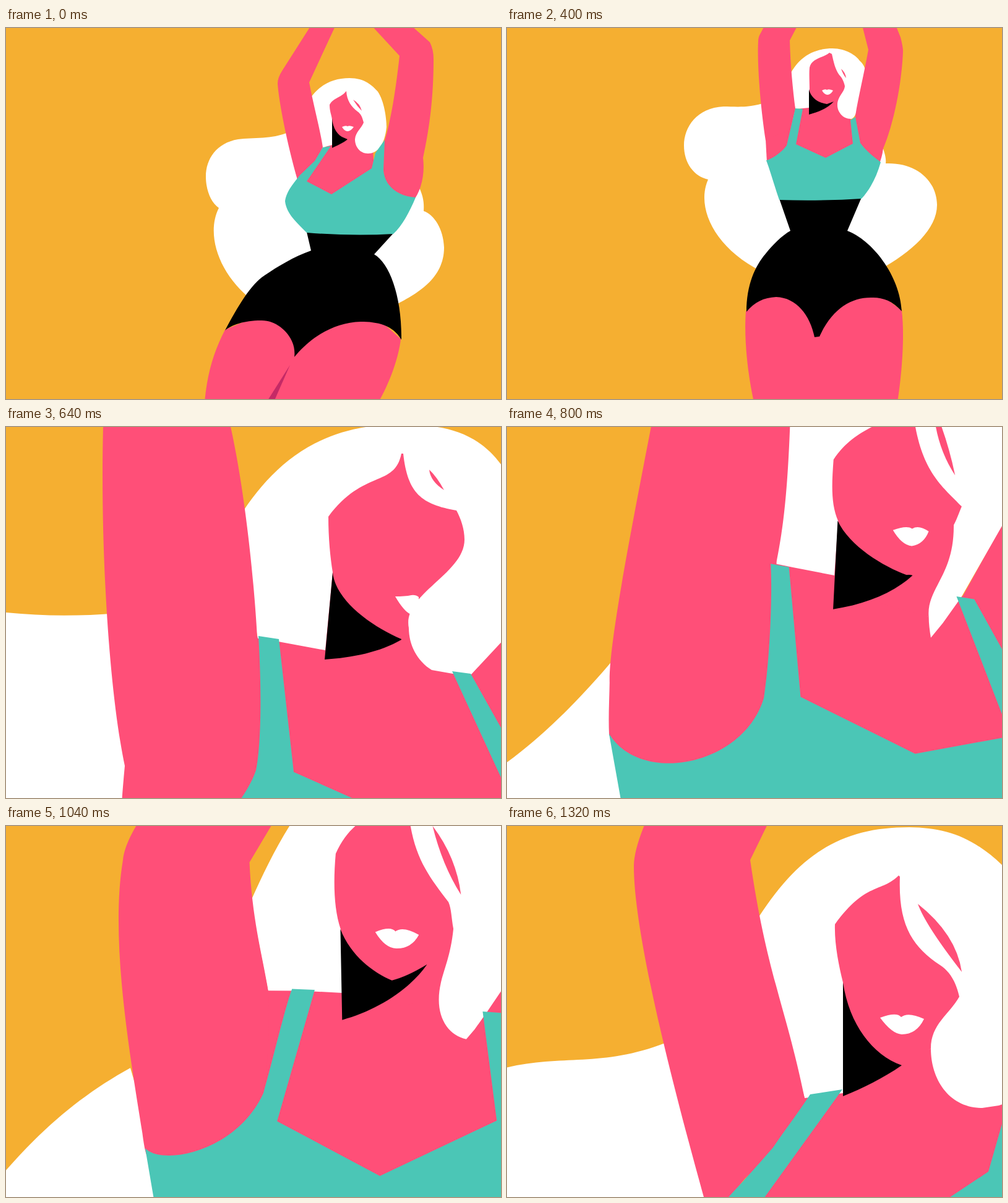
Write an HTML page that moves like this. It is 800 px wide and 600 px high and loops after 1.36 s.

```html
<!DOCTYPE html>
<html lang="en">
<head>
<meta charset="utf-8">
<title>Dancer</title>
<style>
  html, body { margin: 0; width: 100%; height: 100%; overflow: hidden; background: #f5af31; }
  svg { display: block; width: 100vw; height: 100vh; }
</style>
</head>
<body>
<svg id="stage" viewBox="0 0 800 600"></svg>
<script>
const PINK = '#ff4f78', TEAL = '#4bc6b6', WHITE = '#fff', BLACK = '#000', CREASE = '#c42a66';
const LOOP = 1360, CUT = 600, STEP = 40, SETTLE = 60;

// Each part: colour, then one path per key pose, back to front.
const wide = {
  times: [0, 160, 400],
  parts: [
    // back hair
    [WHITE,
      'M455 169C430 180 400 177 375 180C340 186 323 212 323 240C323 262 331 282 344 291C322 335 345 400 400 442L625 450C665 430 708 405 708 355C707 325 692 302 675 296C676 280 674 270 664 250Z',
      'M440 150C415 160 385 157 365 160C325 164 304 197 304 228C304 255 318 277 336 286C318 320 330 385 390 436L620 446C660 425 700 395 700 351C700 315 680 292 655 285C656 270 650 245 643 215Z',
      'M420 120C390 130 370 127 350 127C307 129 286 160 286 190C286 218 302 240 325 245C305 290 335 355 410 393L600 392C655 362 695 325 695 286C694 245 660 217 612 219C613 212 611 203 606 190Z'],
    // chest
    [PINK,
      'M525 180L590 150L595 230L526 275L480 250Z',
      'M500 160L570 130L575 210L516 247L470 222Z',
      'M475 128L550 100L560 190L515 215L462 190Z'],
    // hair
    [WHITE,
      'M512 193L485 125C500 95 525 81 555 81C580 81 592 93 601 103C611 118 615 145 615 160C612 190 600 203 585 203C572 203 564 192 564 180Z',
      'M491 165L478 105C490 75 515 54 546 54C570 54 585 66 593 75C600 88 602 100 600 110C594 150 592 183 578 183C566 183 557 172 557 160Z',
      'M466 131L455 80C468 52 490 33 526 33C548 33 565 45 570 53C578 60 580 68 578 72C572 110 566 147 556 147C542 147 534 135 534 125Z'],
    // face
    [PINK,
      'M550 102C540 114 530 112 523 124C523 135 526 140 527 148L527 194L560 200L564 180C565 168 574 163 578 153C576 145 574 139 568 135C558 127 551 118 550 102Z',
      'M537 67C534 80 522 76 517 84C514 95 516 108 517 120L517 167L552 176L557 160C558 150 566 144 567 133C566 122 562 114 556 108C547 97 544 85 544 65Z',
      'M521 40C513 48 492 48 489 64C488 74 489 86 489 100L489 139L528 145L534 125C534 110 545 105 546 94C544 85 541 80 537 76C530 66 528 55 525 42Z'],
    // gap in the fringe
    [PINK,
      'M561 116Q572 122 575 134Q567 126 561 116Z',
      'M556 93Q556 93 556 93Q556 93 556 93Z',
      'M540 66Q547 72 548 81Q543 75 540 66Z'],
    // neck shadow
    [BLACK,
      'M527 146C528 163 537 174 545 177L552 180C545 186 535 190 527 194Z',
      'M516 119C520 137 533 147 543 149L555 144C545 157 530 164 517 169Z',
      'M488 99C491 113 503 121 517 123L528 119C518 130 503 136 488 140Z'],
    // lips
    [WHITE,
      'M543 160Q549 157 552 159Q555 157 562 160Q557 167 552 167Q547 167 543 160Z',
      'M534 127Q540 124 543 126Q546 124 553 127Q548 134 543 134Q538 134 534 127Z',
      'M509 101Q514 98 517 100Q520 98 527 101Q523 108 518 108Q513 108 509 101Z'],
    // left arm
    [PINK,
      'M503 -20L447 68Q439 80 439 90C441 120 455 190 471 245L499 220L512 193C508 165 497 125 490 88L540 -20Z',
      'M467 -20L431 40Q425 50 425 56C427 100 437 170 447 213L446 234L477 205L491 165C484 130 478 90 475 57L512 -20Z'.replace('L446 234', ''),
      'M425 -20L409 10Q406 15 406 22C404 60 410 130 418 182L452 195L466 131C462 100 458 60 457 20L478 -20Z'],
    // left armpit
    [PINK,
      'M465 220L471 245L501 222L505 190Z',
      'M447 211L446 235L479 204L482 180Z',
      'M418 180L420 217L454 195L456 165Z'],
    // right arm
    [PINK,
      'M576 -20L636 45C630 100 622 150 612 182L602 230L615 300L662 274C672 258 677 235 674 210C685 160 691 110 691 50Q691 35 685 23L637 -20Z',
      'M577 -20L608 35C603 80 595 125 590 160L582 210L600 265L636 246C643 232 648 220 646 200C656 165 664 100 663 45Q663 27 659 18L632 -20Z',
      'M570 -20L584 35C577 75 568 110 563 142L566 190L596 230L603 216C607 205 607 200 608 195C625 155 638 90 640 38Q640 30 636 15L622 -20Z'],
    // legs
    [PINK,
      'M354 488C335 525 325 560 321 605L602 605C622 570 635 530 638 503L590 460L420 460Z',
      'M366 470C350 515 347 560 348 605L608 605C625 555 634 515 634 482L590 440L420 440Z',
      'M386 458C383 500 388 555 399 605L631 605C638 560 643 500 638 457L590 420L425 420Z'],
    [CREASE,
      'M459 545L423 602L434 602Z',
      'M460 586L455 602L459 602Z',
      'M462 620L460 640L462 640Z'],
    // shorts
    [BLACK,
      'M486 330L626 332L595 366C620 380 640 435 639 504C625 480 600 475 573 475C535 476 500 495 473 524L466 532C470 500 440 472 412 473C385 473 365 480 354 489C375 450 395 415 418 400C440 385 465 370 493 360Z',
      'M468 305L603 304L575 348C610 365 638 425 634 483C620 464 600 455 575 455C535 456 502 478 480 512L472 516C472 485 450 455 417 454C395 455 378 462 366 471C375 440 395 400 417 383C435 367 458 353 479 344Z',
      'M440 276L573 274L550 328C590 343 635 400 638 458C622 440 605 435 588 436C555 436 525 455 505 499L497 500C490 465 468 436 435 435C415 436 400 443 387 459C387 415 401 385 418 365C428 352 445 335 458 328Z'],
    // top
    [TEAL,
      'M512 193L525 191L486 248L526 269L591 227L597 202L612 181L610 230C612 255 632 272 662 274C652 298 640 320 626 333Q560 337 486 331C470 315 453 300 451 280C453 265 463 253 475 238L499 215Z',
      'M491 165L505 164L475 221L516 242L574 207L577 183L589 158L590 205C592 230 612 244 636 246C628 270 615 290 603 305Q545 310 468 306C456 290 440 265 437 248C443 238 455 225 470 208L477 199Z',
      'M466 130L478 131L467 188L515 210L559 187L555 149L563 144L571 186C580 198 592 208 604 217C597 242 586 262 573 276Q510 280 440 278C433 258 427 236 419 214C428 212 440 203 447 196L452 190Z']
  ]
};

const close = {
  times: [640, 920, 1160, 1320],
  parts: [
    // back hair
    [WHITE,
      'M-20 298C50 306 110 307 180 301L260 650L-20 650Z',
      'M0 617C60 550 120 480 190 388L260 650L-20 650Z',
      'M-20 474C60 400 130 378 220 379L300 650L-20 650Z',
      'M-20 396C80 365 150 395 265 347L330 650L-20 650Z'],
    // chest
    [PINK,
      'M405 338L520 330L700 250L752 395L830 310L830 650L250 650Z',
      'M441 200L537 190L690 150L742 250L830 80L830 650L250 650Z',
      'M416 353L548 335L690 250L800 370L830 370L830 650L290 650Z',
      'M478 436L545 420L700 300L800 445L830 430L830 650L330 650Z'],
    // hair
    [WHITE,
      'M407 342L370 157C425 66 500 -4 635 -4C700 -4 772 2 815 85L820 327L752 400L722 399L688 393C664 378 651 352 651 325L516 361L440 347Z',
      'M442 204L430 -40C480 -140 560 -180 640 -180C720 -180 780 -140 850 -80L820 105L742 250L715 300L701 330C698 320 695 310 695 297L537 218L473 208Z',
      'M417 356L365 268C405 180 425 60 540 -50C620 -90 760 -80 850 0L850 350L810 379L797 381L780 381C730 379 697 340 697 285L548 350L480 353Z',
      'M481 440L400 158C470 45 540 2 650 2C715 3 760 20 815 78L830 435L810 447L795 452L768 456C715 456 685 410 685 360L543 432L490 439Z'],
    // face
    [PINK,
      'M639 43C628 98 578 68 521 145C521 180 524 210 528 235L516 361L600 365L651 325C640 270 741 238 741 182C741 165 735 148 728 135C672 125 649 108 642 43Z',
      'M650 -85C640 -30 570 -40 531 27C527 70 525 105 539 135L537 218L615 270L695 297C694 255 716 240 717 157C720 150 726 138 731 128C700 80 660 50 655 -85Z',
      'M639 -1C610 18 565 10 533 88C530 130 534 180 542 215L548 350L620 340L697 285C697 250 720 225 731 195C722 165 715 150 700 138C655 95 640 60 640 -1Z',
      'M633 80C605 108 580 90 530 159C529 190 536 225 543 253L543 432L610 410L685 360C685 320 715 305 731 276C725 250 715 235 700 225C655 195 632 160 635 82Z'],
    // gap in the fringe
    [PINK,
      'M684 69Q696 80 708 102Q686 88 684 69Z',
      'M690 -50Q720 10 732 84Q697 25 690 -50Z',
      'M684 70Q732 110 736 156Q705 115 684 70Z',
      'M664 126Q726 175 735 236Q676 160 664 126Z'],
    // neck shadow
    [BLACK,
      'M528 235C532 280 590 322 639 343Q639 343 639 344C605 364 560 373 515 376Z',
      'M538 134C560 175 610 205 642 216Q655 214 666 210C635 245 590 268 535 280Z',
      'M542 215C552 265 580 295 612 310Q640 302 682 274C655 315 600 352 548 369Z',
      'M543 253C553 320 590 370 638 387Q638 387 638 387C608 408 575 424 543 437Z'],
    // lips
    [WHITE,
      'M629 274Q645 274 655 272Q662 271 667 275Q668 295 654 303Q643 298 629 274Z',
      'M615 141Q640 130 648 139Q660 130 682 144Q670 166 648 166Q630 166 615 141Z',
      'M585 230Q610 221 617 230Q628 221 656 235Q645 258 620 258Q603 258 585 230Z',
      'M603 310Q630 300 637 309Q648 300 674 312Q662 337 638 337Q622 336 603 310Z'],
    // left arm
    [PINK,
      'M158 -60Q157 -40 157 0C152 200 167 430 192 548C189 580 185 630 182 690C260 740 385 660 404 555C412 510 412 400 406 340C402 265 388 110 362 -5L350 -60Z',
      'M262 -60Q253 -30 246 0C205 170 176 340 176 400C177 425 177 440 180 455C205 535 380 525 419 405C430 330 438 240 442 204C452 150 458 120 468 -5L474 -60Z',
      'M225 -45Q140 55 141 100C141 200 235 430 273 600C276 610 279 620 281 628C300 640 360 560 415 480C425 440 420 400 417 356C390 285 350 195 328 107L440 -53Z',
      'M250 -60Q205 25 205 65C205 190 285 480 318 600C322 615 326 630 330 650C350 610 390 560 430 520C445 500 460 480 481 440C450 290 420 240 393 55L449 -60Z'],
    // top
    [TEAL,
      'M408 338L441 343L465 558L660 645L830 632L721 395L751 399L830 540L830 760L200 760L190 700C300 715 386 610 404 555C413 510 413 420 408 338Z',
      'M442 204L473 208L466 417L643 509L803 458L741 251L770 255L830 385L830 700L222 700L177 447C205 535 380 525 419 405C432 330 440 230 442 204Z',
      'M480 350L524 348L409 562L568 645L785 519L797 380L830 380L830 500L830 740L300 740L281 618C320 585 372 540 415 480C435 440 460 390 480 350Z',
      'M490 434L542 426L395 630L560 704L778 559L802 475L830 470L830 550L830 740L345 740L327 634C365 592 385 572 430 520C450 490 470 465 490 434Z']
  ]
};

const NUM = /-?\d+/g;
const stage = document.getElementById('stage');

function svg(tag, parent) {
  return parent.appendChild(document.createElementNS('http://www.w3.org/2000/svg', tag));
}

function build(scene) {
  scene.group = svg('g', stage);
  scene.shapes = scene.parts.map(([fill, ...keys]) => {
    const path = svg('path', scene.group);
    path.setAttribute('fill', fill);
    return { path, form: keys[0], poses: keys.map(k => k.match(NUM).map(Number)) };
  });
}

// Past the outer keys the motion settles instead of running on.
function settle(t, times) {
  const first = times[0], last = times[times.length - 1];
  const ease = d => SETTLE * (1 - Math.exp(-d / SETTLE));
  return t < first ? first - ease(first - t) : t > last ? last + ease(t - last) : t;
}

// Hermite curve through the keys, with parabolic tangents.
function curve(times, v, t) {
  const n = times.length - 1;
  const gap = i => times[i + 1] - times[i];
  const slope = i => (v[i + 1] - v[i]) / gap(i);
  const tangent = i =>
    i === 0 ? 2 * slope(0) - tangent(1) :
    i === n ? 2 * slope(n - 1) - tangent(n - 1) :
    (gap(i) * slope(i - 1) + gap(i - 1) * slope(i)) / (gap(i - 1) + gap(i));
  let i = 0;
  while (i < n - 1 && t > times[i + 1]) i++;
  const h = gap(i), u = (t - times[i]) / h, w = 1 - u;
  return w * w * (1 + 2 * u) * v[i] + u * u * (3 - 2 * u) * v[i + 1]
    + h * u * w * (w * tangent(i) - u * tangent(i + 1));
}

function draw(scene, t) {
  const at = settle(t, scene.times);
  for (const { path, form, poses } of scene.shapes) {
    let i = 0;
    path.setAttribute('d', form.replace(NUM, () => {
      const k = i++;
      return curve(scene.times, poses.map(p => p[k]), at).toFixed(2) + ' ';
    }));
  }
}

let shown = -1;
function tick() {
  const t = Math.floor(performance.now() % LOOP / STEP) * STEP;
  if (t !== shown) {
    shown = t;
    const scene = t < CUT ? wide : close;
    for (const s of [wide, close]) s.group.style.display = s === scene ? '' : 'none';
    draw(scene, t);
  }
  requestAnimationFrame(tick);
}

build(wide);
build(close);
tick();
</script>
</body>
</html>
```
